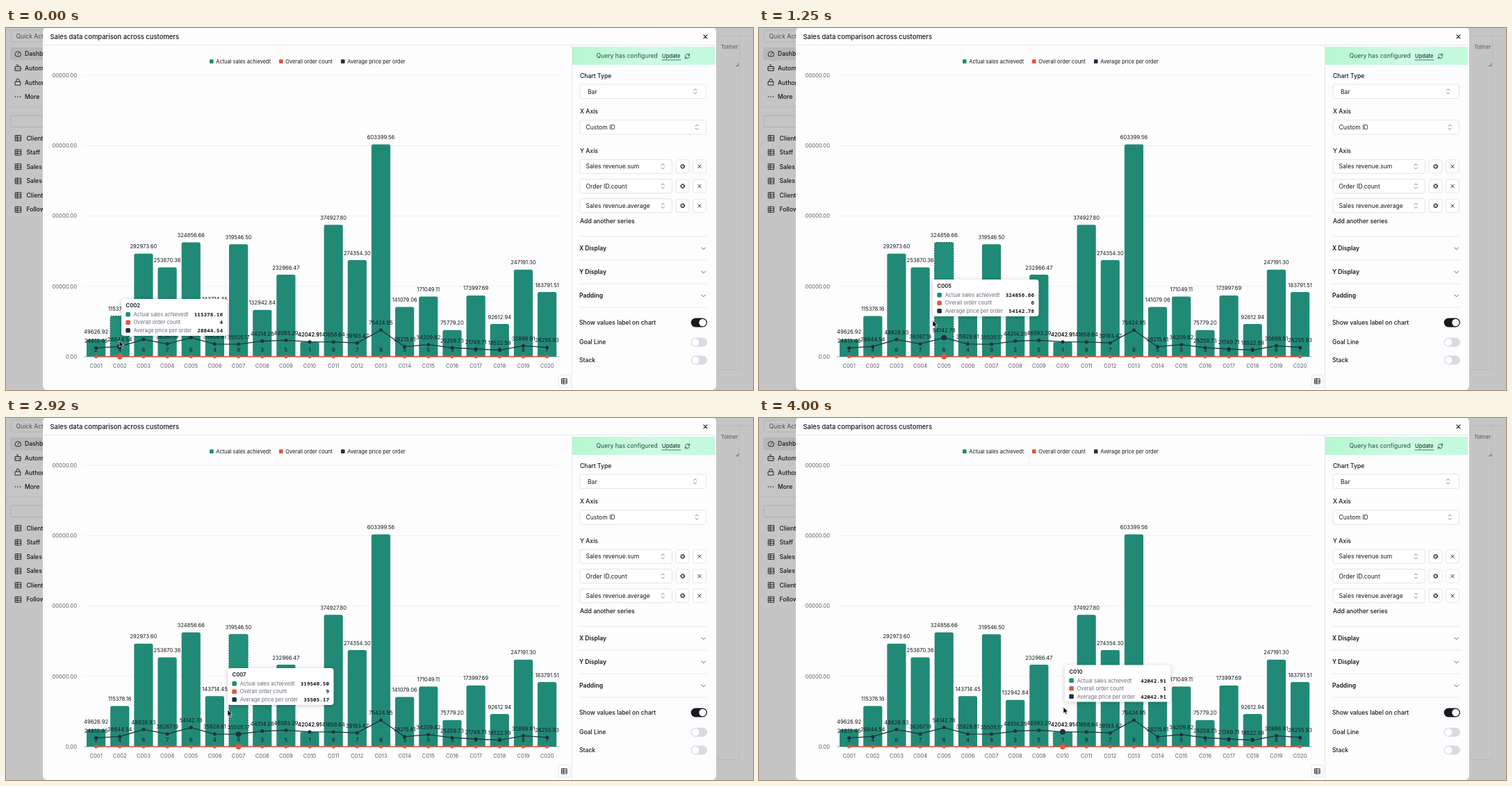
Write an HTML page that moves like this. It is 1075 by 521 pixels and loops after 4.08 s.

```html
<!DOCTYPE html>
<html lang="en">
<head>
<meta charset="utf-8">
<title>Sales chart</title>
<style>
  html, body { margin: 0; width: 100%; height: 100%; overflow: hidden; background: #c5c5c5; }
  svg { display: block; width: 1075px; height: 521px; font-family: Inter, "Liberation Sans", sans-serif; }
  text { white-space: pre; }
  .mono { font-family: "Noto Sans Mono", "DejaVu Sans Mono", monospace; }
  .tip { filter: drop-shadow(0 1px 3px rgba(0, 0, 0, .2)); }
</style>
</head>
<body>
<svg id="stage" viewBox="0 0 1075 521">
  <defs>
    <linearGradient id="mint">
      <stop offset="0" stop-color="#b5f7d0"/>
      <stop offset=".55" stop-color="#cffae3"/>
      <stop offset="1" stop-color="#c0fadb"/>
    </linearGradient>
  </defs>
</svg>
<script>
const stage = document.getElementById('stage');
const GREEN = '#218a77', RED = '#e1573e', NAVY = '#22303f', INK = '#15171c', LINE = '#e3e5ea';

function add(tag, attrs, parent = stage) {
  const el = document.createElementNS('http://www.w3.org/2000/svg', tag);
  for (const key in attrs) el.setAttribute(key, attrs[key]);
  parent.appendChild(el);
  return el;
}
function box(x, y, w, h, fill, more, parent) {
  return add('rect', { x, y, width: w, height: h, fill, ...more }, parent);
}
function stroke(d, color = INK, width = 1, more, parent) {
  return add('path', { d, fill: 'none', stroke: color, 'stroke-width': width,
    'stroke-linecap': 'round', 'stroke-linejoin': 'round', ...more }, parent);
}
function dot(cx, cy, r, fill, parent) {
  return add('circle', { cx, cy, r, fill }, parent);
}
// cy is the middle of the capitals
function label(x, cy, str, size = 8.6, more, parent) {
  const el = add('text', { x, y: cy + size * 0.364, 'font-size': size, fill: INK, ...more }, parent);
  el.textContent = str;
  return el;
}
const medium = { 'font-weight': 500 };
const middle = { 'text-anchor': 'middle' };

function tableIcon(x, y, s = 4) {
  stroke(`M${x - s} ${y - s}h${2 * s}v${2 * s}h${-2 * s}zM${x - s} ${y - s / 3}h${2 * s}` +
    `M${x - s} ${y + s / 3}h${2 * s}M${x - s / 3} ${y - s}v${2 * s}`, INK, 0.85);
}

function drawPage() {
  box(0, 0, 1075, 521, '#c5c5c5');
  box(7, 3, 60, 17, 'none', { rx: 3, stroke: '#aeaeb0', 'stroke-width': 0.8 });
  label(14.5, 11.5, 'Quick Actions', 8.6, { fill: '#4a4b50' });
  box(6, 28, 60, 18.5, '#b7b7b8', { rx: 3 });
  ['Dashboard', 'Automation', 'Authority', 'More'].forEach((s, i) => label(27, 37.2 + i * 20.6, s, 8.6, medium));
  stroke('M14 40.5a4.2 4.2 0 1 1 6.6 0zM17 38l2-2.5', INK, 0.9);
  stroke('M13.5 55.5h7.5v6h-7.5zM17.2 55.5v-2.4h-2M15.8 58v1M18.8 58v1M12.4 58.5h1M21 58.5h1', INK, 0.9);
  stroke('M13.4 77.2h7.4v5h-7.4zM15 77v-1.7a2.1 2.1 0 0 1 4.2 0v1.7', INK, 0.9);
  [13.5, 17, 20.5].forEach(x => dot(x, 99, 0.8, INK));
  stroke('M0 113.5H53', '#b5b5b7', 0.8);
  box(6.5, 126, 60, 16.5, 'none', { rx: 2.5, stroke: '#aaaaad', 'stroke-width': 0.8 });
  ['Clients', 'Staff', 'Sales', 'Sales', 'Clients', 'Follow'].forEach((s, i) => {
    const y = 158.5 + i * 20.55;
    tableIcon(17.6, y);
    label(29.5, y, s, 8.6, medium);
  });
  stroke('M1022 11H1075M1055.5 11V491M1022 491.5H1055', '#b7b7b9', 0.8);
  label(1029, 27, 'Tolmer', 7.5, { fill: '#55575d' });
  stroke('M1050.5 54.5h3.2v-3.2', '#55575d', 0.9);
}

function drawPanel() {
  const chevrons = (x, y) => stroke(`M${x - 2} ${y - 1.6}l2 -2 2 2M${x - 2} ${y + 1.6}l2 2 2 -2`, '#5d626c', 0.8);
  const frame = (x, y, w, h) => box(x, y, w, h, '#fff', { rx: 3, stroke: '#dcdfe5', 'stroke-width': 0.8 });

  stroke('M814.5 25V521', LINE, 0.9);
  box(815, 27, 205, 26, 'url(#mint)');
  label(849.5, 40.3, 'Query has configured', 8.6, { fill: '#1f5140' });
  label(944, 40.5, 'Update', 7.7, { ...medium, fill: '#1c3d35' });
  stroke('M944 46H971', '#1c3d35', 0.7);
  stroke('M977.6 40a3 3 0 0 1 5.2 -1.6l.7 .8M983.5 37v2.2h-2.2M983.4 41.2a3 3 0 0 1 -5.2 1.6l-.7 -.8M977.5 44.2v-2.2h2.2', '#1c3d35', 0.8);

  label(826, 69, 'Chart Type', 8.6, medium);
  frame(826, 81, 181.5, 20.5);
  label(837, 91.5, 'Bar');
  chevrons(991.7, 91.3);
  label(826, 120.3, 'X Axis', 8.6, medium);
  frame(826, 132.5, 181.5, 20.5);
  label(834.5, 143, 'Custom ID');
  chevrons(994.2, 142.7);

  label(826, 177, 'Y Axis', 8.6, medium);
  ['Sales revenue.sum', 'Order ID.count', 'Sales revenue.average'].forEach((s, i) => {
    const y = 199.3 + i * 28.25;
    frame(826, y - 10, 132.5, 20);
    label(834.5, y, s);
    chevrons(945.3, y);
    frame(964, y - 9.5, 19, 19);
    add('circle', { cx: 973.7, cy: y, r: 2.7, fill: 'none', stroke: INK, 'stroke-width': 1.5, 'stroke-dasharray': '1.35 .77' });
    add('circle', { cx: 973.7, cy: y, r: 2, fill: 'none', stroke: INK, 'stroke-width': 0.7 });
    frame(988.5, y - 9.5, 19, 19);
    stroke(`M995.8 ${y - 2.2}l4.4 4.4M1000.2 ${y - 2.2}l-4.4 4.4`, INK, 0.9);
  });
  label(826, 277.8, 'Add another series', 8.7, medium);

  ['X Display', 'Y Display', 'Padding'].forEach((s, i) => {
    const y = 317 + i * 34;
    stroke(`M825 ${y - 17}H1009`, LINE, 0.8);
    label(825, y, s, 8.6, { 'font-weight': 600 });
    stroke(`M1001 ${y - 1}l2.8 2.8 2.8 -2.8`, '#4d525b', 0.9);
  });
  stroke('M825 402H1009', LINE, 0.8);

  [['Show values label on chart', 424, true], ['Goal Line', 452.2], ['Stack', 478]].forEach(([s, y, on]) => {
    label(825, y, s, 8.6, medium);
    box(985.7, y - 6.5, 23.3, 13, on ? '#18181f' : '#d9dbe4', { rx: 6.5 });
    dot(on ? 1002.5 : 992.2, y, 5.2, '#fff');
  });
}

const sums = [49626.92, 115378.16, 292973.6, 253870.36, 324856.66, 143714.45, 319546.5, 132942.84, 232966.47, 42042.91,
  374927.8, 274354.3, 603399.56, 141079.06, 171049.11, 75779.2, 173997.69, 92612.94, 247191.3, 183791.51];
const counts = [2, 4, 6, 7, 6, 4, 9, 3, 5, 1, 9, 7, 8, 5, 5, 3, 8, 5, 8, 7];
const FIRST = 129.6, PITCH = 34.16, BASE = 473;
const items = sums.map((sum, i) => ({
  id: 'C' + String(i + 1).padStart(3, '0'),
  x: FIRST + i * PITCH,
  sum,
  count: counts[i],
  mean: Math.round(Math.round(sum * 100) / counts[i]) / 100
}));
const yOf = v => BASE - v * 101.25 / 200000;
const series = ['Actual sales achievedt', 'Overall order count', 'Average price per order'];
const colors = [GREEN, RED, NAVY];

function drawChart() {
  [293, 393, 482].forEach((x, i) => {
    box(x, 45.3, 5.6, 5.6, colors[i], { rx: 1 });
    label(x + 9.3, 48.2, series[i], 7.45);
  });
  for (let i = 0; i < 5; i++) {
    const y = 68.3 + i * 101.2;
    stroke(`M112.5 ${y}H796`, i < 4 ? '#eceef2' : '#8a9099', 0.8);
    label(102, y, i < 4 ? '00000.00' : '0.00', 7.65, { 'text-anchor': 'end', fill: '#565c67' });
  }
  for (const it of items) {
    const y = yOf(it.sum), l = it.x - 13.6;
    it.bar = add('path', { fill: GREEN, 'stroke-width': 1.2, 'stroke-dasharray': '2 1.6',
      d: `M${l} ${BASE}V${y + 2.5}q0 -2.5 2.5 -2.5h22.2q2.5 0 2.5 2.5V${BASE}z` });
    label(it.x, 486, it.id, 7.65, { ...middle, fill: '#565c67' });
  }
  const path = value => 'M' + items.map(it => `${it.x} ${value(it)}`).join('L');
  stroke(path(it => yOf(it.count)), RED, 1.3);
  stroke(path(it => yOf(it.mean)), NAVY, 1.3);
  for (const it of items) {
    it.dots = [dot(it.x, yOf(it.count), 2.5, RED), dot(it.x, yOf(it.mean), 2.5, NAVY)];
  }
  for (const it of items) {
    label(it.x, yOf(it.sum) - 10.2, it.sum.toFixed(2), 7.65, middle);
    label(it.x, yOf(it.count) - 10.2, it.count, 7.65, middle);
    label(it.x, yOf(it.mean) - 10.2, it.mean.toFixed(2), 7.65, middle);
  }
  box(795, 499.5, 17, 17.5, '#fff', { rx: 3, stroke: '#dcdfe5', 'stroke-width': 0.8 });
  tableIcon(803.5, 508.3, 3.6);
}

drawPage();
box(53, -1, 969, 522, '#fdfdfe', { rx: 6 });
label(63.5, 12.7, 'Sales data comparison across customers', 9.45, medium);
stroke('M1004 9.9l5 5M1009 9.9l-5 5', INK, 1.1);
stroke('M53 24.5H1022', LINE, 0.9);
drawPanel();
drawChart();

const tip = add('g', { class: 'tip' });
box(0, 0, 152.5, 53, '#fff', { rx: 4 }, tip);
const tipTitle = label(6.5, 9.7, '', 7.65, { 'font-weight': 600 }, tip);
const tipValues = series.map((name, i) => {
  const y = 22.2 + i * 11.5;
  box(6.3, y - 3.3, 6.6, 6.6, colors[i], { rx: 1.5 }, tip);
  label(17.7, y, name, 7.45, { fill: '#666d7a' }, tip);
  return label(146, y, '', 7.65, { class: 'mono', 'font-weight': 600, 'text-anchor': 'end' }, tip);
});
const cursor = add('path', { d: 'M0 0V9.3L2.2 7.3 3.7 10.6 5.3 9.9 3.9 6.7H6.8z',
  fill: '#000', stroke: '#fff', 'stroke-width': 0.7, 'stroke-linejoin': 'round' });

// time, pointer x and y, tooltip left and top
const track = [
  [0, 163, 450, 166, 390],
  [170, 165, 447, 167, 390],
  [420, 198, 431, 175.5, 385],
  [580, 212, 426, 200, 374],
  [750, 214, 424, 206, 372],
  [920, 232, 422, 212, 370],
  [1080, 245, 421, 236, 364],
  [1250, 250, 421, 250, 362],
  [1670, 264, 421, 273, 361.8],
  [2080, 266, 425, 273, 361.5],
  [2330, 276, 422, 273, 361],
  [2420, 294, 421, 281, 360.6],
  [2580, 308, 421, 301, 360.5],
  [2920, 319, 420, 319, 360],
  [3170, 343, 420, 334, 359.7],
  [3330, 375, 419, 353, 359.3],
  [3500, 385, 419, 375, 359],
  [3750, 424, 417, 411, 357],
  [4000, 438, 416, 440, 355.6]
];
const LOOP = 4080;

// the picture advances twelve times a second, on whole hundredths
function snap(t) {
  const at = k => Math.round(k * 100 / 12) * 10;
  let k = Math.floor(t * 12 / 1000) + 1;
  while (at(k) > t) k--;
  return Math.min(at(k), 4000);
}

function sample(t) {
  let i = 0;
  while (i < track.length - 2 && track[i + 1][0] <= t) i++;
  const a = track[i], b = track[i + 1];
  const f = Math.min(1, (t - a[0]) / (b[0] - a[0]));
  return a.map((v, j) => v + (b[j] - v) * f);
}

let active = null;
function hover(it) {
  if (it === active) return;
  if (active) mark(active, false);
  mark(it, true);
  active = it;
  tipTitle.textContent = it.id;
  [it.sum.toFixed(2), it.count, it.mean.toFixed(2)].forEach((v, i) => { tipValues[i].textContent = v; });
}
function mark(it, on) {
  it.bar.setAttribute('stroke', on ? '#17685b' : 'none');
  it.bar.setAttribute('fill', on ? '#23907c' : GREEN);
  it.dots.forEach(d => d.setAttribute('r', on ? 3.9 : 2.5));
}

function render(t) {
  const [, cx, cy, tx, ty] = sample(snap(t));
  hover(items[Math.round((cx - FIRST) / PITCH)]);
  tip.setAttribute('transform', `translate(${tx} ${ty})`);
  cursor.setAttribute('transform', `translate(${cx} ${cy})`);
}

render(0);
const start = performance.now();
function tick() {
  render((performance.now() - start) % LOOP);
  requestAnimationFrame(tick);
}
requestAnimationFrame(tick);
</script>
</body>
</html>
```
